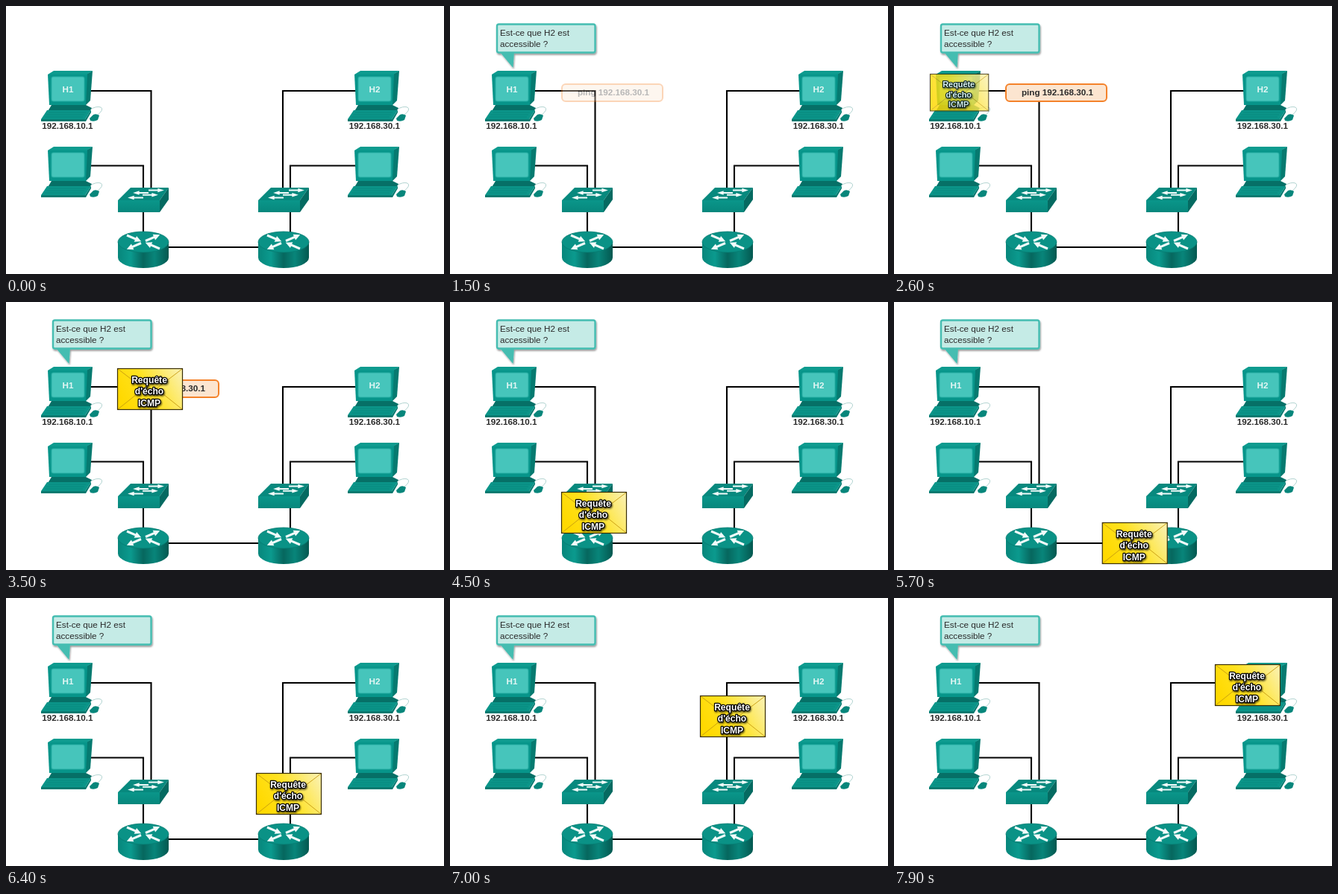
Write an HTML page that moves like this. It is 587 by 360 pixels and loops after 8000 ms.

```html
<!DOCTYPE html>
<html lang="fr">
<head>
<meta charset="utf-8">
<title>Ping</title>
<style>
html, body { margin: 0; width: 100%; height: 100%; overflow: hidden; background: #fff; }
svg { display: block; width: 587px; height: 360px; }
text { font-family: "Liberation Sans", Arial, sans-serif; font-size: 11.7px; fill: #2b2b2b; }
.b { font-weight: bold; }
.mid { text-anchor: middle; }
.wire { fill: none; stroke: #000; stroke-width: 2.1; }
.label { font-size: 11.7px; font-weight: bold; fill: #e3f6f4; text-anchor: middle; }
.mail { font-size: 12.1px; font-weight: bold; fill: #fff; text-anchor: middle;
  stroke: #000; stroke-width: 2.4px; stroke-linejoin: round; paint-order: stroke; }
</style>
</head>
<body>
<svg viewBox="0 0 587 360">
  <defs>
    <linearGradient id="gold" x1="0" y1=".6" x2="1" y2=".25">
      <stop offset="0" stop-color="#ffd900"/><stop offset=".45" stop-color="#ffe21f"/><stop offset="1" stop-color="#fbf0a6"/>
    </linearGradient>
    <linearGradient id="drum">
      <stop offset="0" stop-color="#07867b"/><stop offset=".25" stop-color="#0b9a8e"/><stop offset=".5" stop-color="#06675e"/>
      <stop offset=".72" stop-color="#08857a"/><stop offset="1" stop-color="#045850"/>
    </linearGradient>
    <linearGradient id="front" x1="0" y1="0" x2="0" y2="1">
      <stop offset="0" stop-color="#0a968a"/><stop offset="1" stop-color="#07877c"/>
    </linearGradient>
    <filter id="shade" x="-10%" y="-10%" width="125%" height="130%">
      <feDropShadow dx="1" dy="2" stdDeviation="1.2" flood-opacity=".4"/>
    </filter>
    <filter id="glow" x="-15%" y="-15%" width="135%" height="135%">
      <feDropShadow dx="1" dy="1.5" stdDeviation="1.2" flood-opacity=".7"/>
    </filter>

    <g id="pc">
      <path d="M66 52Q74 47 80 49Q85 52 75 60" fill="none" stroke="#a9cfcb" stroke-width=".9"/>
      <path d="M60 5L69 0L66 40L60 46Z" fill="#067a70"/>
      <path d="M9 5L17 0H69L61 5Z" fill="#0d9b8f"/>
      <path d="M14 46H60L68 50L64 56H8Z" fill="#067067"/>
      <path d="M9 5H62L60 46H11Z" fill="#07958a"/>
      <rect x="13.500" y="7.500" width="45" height="34" rx="3" fill="#27aea3"/>
      <rect x="14.500" y="8.500" width="43" height="32" rx="2.500" fill="#46c5bb"/>
      <path d="M8 53H67L59 65H0Z" fill="#0b9589"/>
      <path d="M0 65H59L67 53V56L60 68H0Z" fill="#067a70"/>
      <path d="M10 56H60M7 59H58M5 62H56" stroke="#07867b" stroke-width=".8"/>
      <path d="M65 64L70 59Q74 57 78 60L76 66Q71 69 66 67Z" fill="#07867b"/>
    </g>

    <path id="arrow" d="M0 -1.6H13V-4.500L22 0L13 4.500V1.600H0Z" fill="#f2fbfa"/>

    <g id="switch">
      <path d="M17 0H68L56 17H0Z" fill="#07897e"/>
      <path d="M0 17H56V33H0Z" fill="url(#front)"/>
      <path d="M56 17L68 0V16L56 33Z" fill="#056a61"/>
      <use href="#arrow" transform="translate(41 3.500) scale(.95 .6)"/>
      <use href="#arrow" transform="translate(41 7) scale(-.95 .6)"/>
      <use href="#arrow" transform="translate(33 9.800) scale(.95 .6)"/>
      <use href="#arrow" transform="translate(34 13.500) scale(-.95 .6)"/>
    </g>

    <g id="router">
      <path d="M0 15V36A34 14 0 0 0 68 36V15Z" fill="url(#drum)"/>
      <ellipse cx="34" cy="15" rx="34" ry="14" fill="#0a9286" stroke="#077b71" stroke-width=".8"/>
      <use href="#arrow" transform="translate(12 6) rotate(23) scale(.95)"/>
      <use href="#arrow" transform="translate(37 13.500) rotate(-23) scale(.95)"/>
      <use href="#arrow" transform="translate(31 16.500) rotate(157) scale(.95)"/>
      <use href="#arrow" transform="translate(56 24) rotate(203) scale(.95)"/>
    </g>
  </defs>

  <rect width="587" height="360" fill="#fff"/>
  <path class="wire" d="M112 114H194.500V248M112 214.500H184V248M184 270V308M470 114H371V248M470 214.500H381V248M381 270V308M214 324H342"/>

  <use href="#pc" x="47" y="87"/>
  <use href="#pc" x="47" y="189"/>
  <use href="#pc" x="458" y="87"/>
  <use href="#pc" x="458" y="189"/>
  <use href="#switch" x="150" y="244"/>
  <use href="#switch" x="338" y="244"/>
  <use href="#router" x="150" y="302"/>
  <use href="#router" x="338" y="302"/>

  <text class="label" x="83" y="116">H1</text>
  <text class="label" x="494" y="116">H2</text>
  <text class="b mid" x="82.300" y="165">192.168.10.1</text>
  <text class="b mid" x="493.800" y="165">192.168.30.1</text>

  <g id="bubble">
    <g filter="url(#shade)">
      <path d="M67 62H86L84.500 83Z" fill="#45bdb1"/>
      <rect x="63" y="24.500" width="131.500" height="38" rx="2.500" fill="#c5ebe6" stroke="#45bdb1" stroke-width="2.400"/>
    </g>
    <text x="67" y="40">Est-ce que H2 est</text>
    <text x="67" y="55">accessible ?</text>
  </g>

  <g id="ping">
    <rect x="150" y="105" width="135" height="23" rx="5" fill="#fce5d0" stroke="#f4822a" stroke-width="2"/>
    <text class="b mid" x="219" y="120">ping 192.168.30.1</text>
  </g>

  <g id="mail">
    <rect x=".5" y=".5" width="87" height="55" fill="url(#gold)"/>
    <path d="M1 55L36 27M87 55L52 27" fill="none" stroke="#c79a10" stroke-width=".9"/>
    <path d="M1 1L39 30Q44 34 49 30L87 1" fill="none" stroke="#c79a10" stroke-width=".9"/>
    <rect x=".5" y=".5" width="87" height="55" fill="none" stroke="#3a2f05" stroke-width="1.200"/>
    <g filter="url(#glow)">
      <text class="mail" x="43" y="19.500">Requête</text>
      <text class="mail" x="43" y="35">d'écho</text>
      <text class="mail" x="43" y="50.500">ICMP</text>
    </g>
  </g>
</svg>
<script>
const LOOP = 8000, STEP = 100;
const [bubble, ping, mail] = ['bubble', 'ping', 'mail'].map(id => document.getElementById(id));

// time, x, y, scale
const route = [
  [2800, 48, 91, .9], [3500, 149, 89, 1], [3700, 149, 118, 1],
  [4500, 149, 255, 1], [4600, 149, 269.5, 1], [4835, 149, 296, 1],
  [6075, 335, 296, 1], [6400, 335, 235, 1], [7000, 335, 131, 1],
  [7215, 335, 89, 1], [7900, 430, 89, 1]
];

const ramp = (t, from, to) => Math.min(1, Math.max(0, (t - from) / (to - from)));

function along(t) {
  let i = 1;
  while (i < route.length - 1 && t > route[i][0]) i++;
  const a = route[i - 1], b = route[i], k = ramp(t, a[0], b[0]);
  return a.map((v, n) => v + (b[n] - v) * k);
}

function draw(t) {
  bubble.setAttribute('opacity', ramp(t, 400, 1000));
  ping.setAttribute('opacity', ramp(t, 1400, 1700) - ramp(t, 3700, 4000));
  mail.setAttribute('opacity', .82 * ramp(t, 2000, 2600) + .18 * ramp(t, 2800, 2900));
  const [, x, y, s] = along(t);
  mail.setAttribute('transform', `translate(${x} ${y}) scale(${s})`);
}

const start = performance.now();
function tick() {
  const t = (performance.now() - start) % LOOP;
  draw(Math.floor(t / STEP) * STEP);
  requestAnimationFrame(tick);
}
draw(0);
requestAnimationFrame(tick);
</script>
</body>
</html>
```
